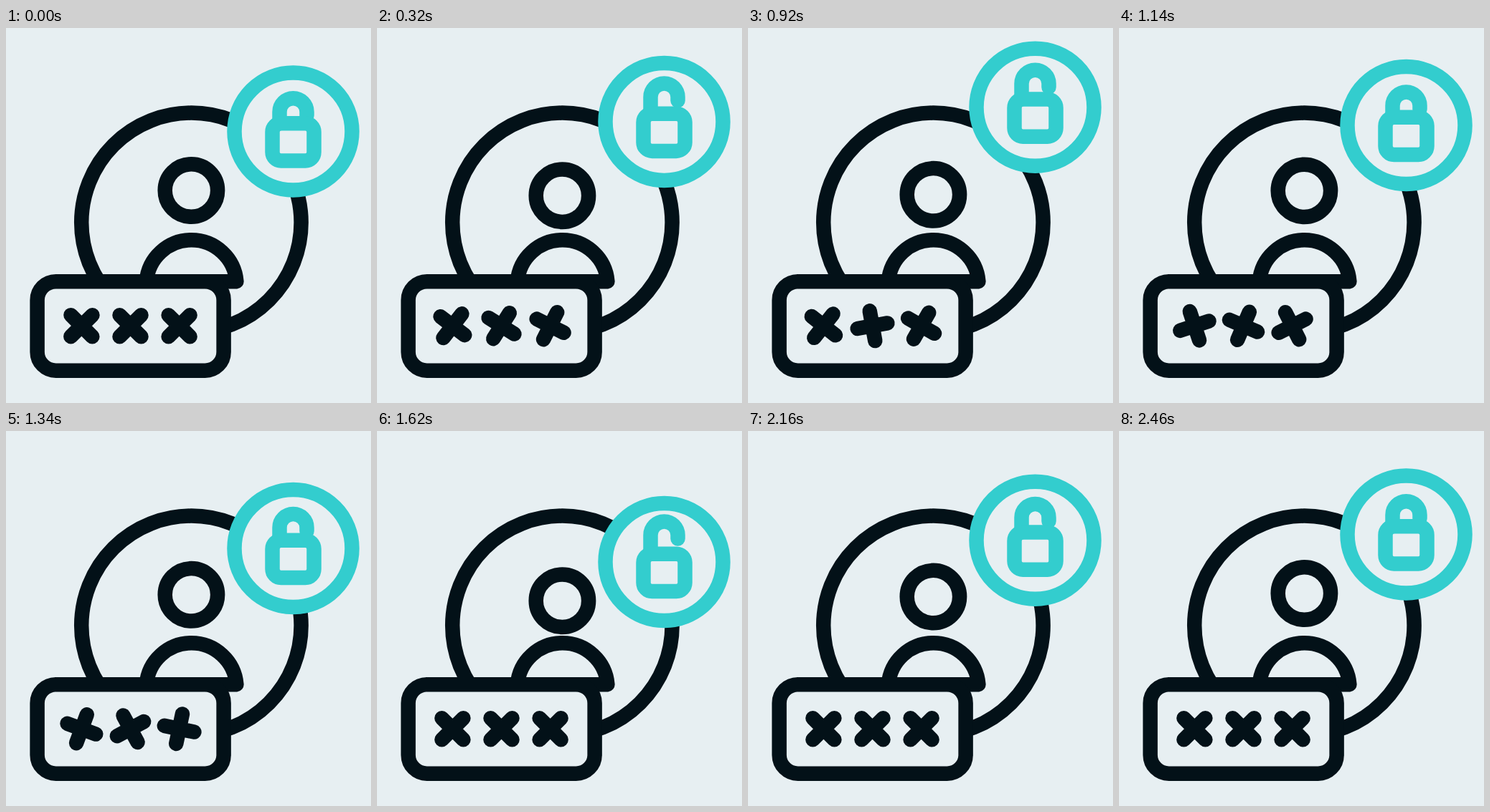
These frames come from a looping animation (509x524 px, 2.62 s). An HTML page:

```html
<!DOCTYPE html>
<html lang="en">
<head>
<meta charset="utf-8">
<title>Account security</title>
<style>
  html, body { margin: 0; width: 100%; height: 100%; overflow: hidden; background: #e7eff2; }
  svg { display: block; width: 100vw; height: 100vh; }
  .line { fill: none; stroke: #031118; stroke-width: 20.5; stroke-linecap: round; stroke-linejoin: round; }
  .solid { fill: #e7eff2; }
  .teal { stroke: #33cdce; }
</style>
</head>
<body>
<svg viewBox="0 0 509 524">
  <g class="line">
    <circle cx="258.4" cy="271.8" r="153.2"/>
    <path d="M195.8 354.2A63 63 0 0 1 321.4 354.2Z"/>
    <circle id="head" cx="258.4" cy="227" r="36.7"/>
    <rect class="solid" x="43.6" y="354.2" width="260" height="124.5" rx="26"/>
    <g id="marks"></g>
  </g>
  <g id="badge" class="line teal">
    <circle class="solid" r="82"/>
    <path id="shackle"/>
    <rect x="-29" y="-11.2" width="58" height="52.2" rx="12"/>
  </g>
</svg>
<script>
const LOOP = 2620;
const SPIN = 180 / 700; // degrees per ms
const $ = id => document.getElementById(id);
const clamp = (v, lo, hi) => Math.min(hi, Math.max(lo, v));

// x centre, start of the turn, end of the turn back
const marks = [
  { x: 105.4, from: 0, to: 1595 },
  { x: 173.5, from: 21, to: 1406 },
  { x: 241.6, from: 42, to: 1562 }
];
for (const m of marks) {
  m.el = document.createElementNS('http://www.w3.org/2000/svg', 'path');
  m.el.setAttribute('d', 'M-15-15L15 15M15-15L-15 15');
  $('marks').append(m.el);
}

// eased interpolation through evenly spaced values
function ease(t, step, values) {
  const last = values.length - 1;
  const p = clamp(t / step, 0, last);
  const i = Math.min(Math.floor(p), last - 1);
  const u = p - i;
  return values[i] + (values[i + 1] - values[i]) * u * u * (3 - 2 * u);
}

function draw(t) {
  const lift = ease(t, 600, [0, 13, 0, 13, 0]);
  const y = ease(t, 800, [144.5, 106, 183, 144.5]);
  $('head').setAttribute('cy', 227 + lift);
  $('badge').setAttribute('transform', `translate(400.5 ${y})`);
  const top = -27.2 - lift;
  $('shackle').setAttribute('d', `M-19-11.2V${top}A19 19 0 0 1 19 ${top}v5`);
  for (const m of marks) {
    const turn = clamp(Math.min(t - m.from, m.to - t) * SPIN, 0, 180);
    m.el.setAttribute('transform', `translate(${m.x} 416.2) rotate(${turn})`);
  }
}

const start = performance.now();
function tick() {
  draw((performance.now() - start) % LOOP);
  requestAnimationFrame(tick);
}
draw(0);
requestAnimationFrame(tick);
</script>
</body>
</html>
```
